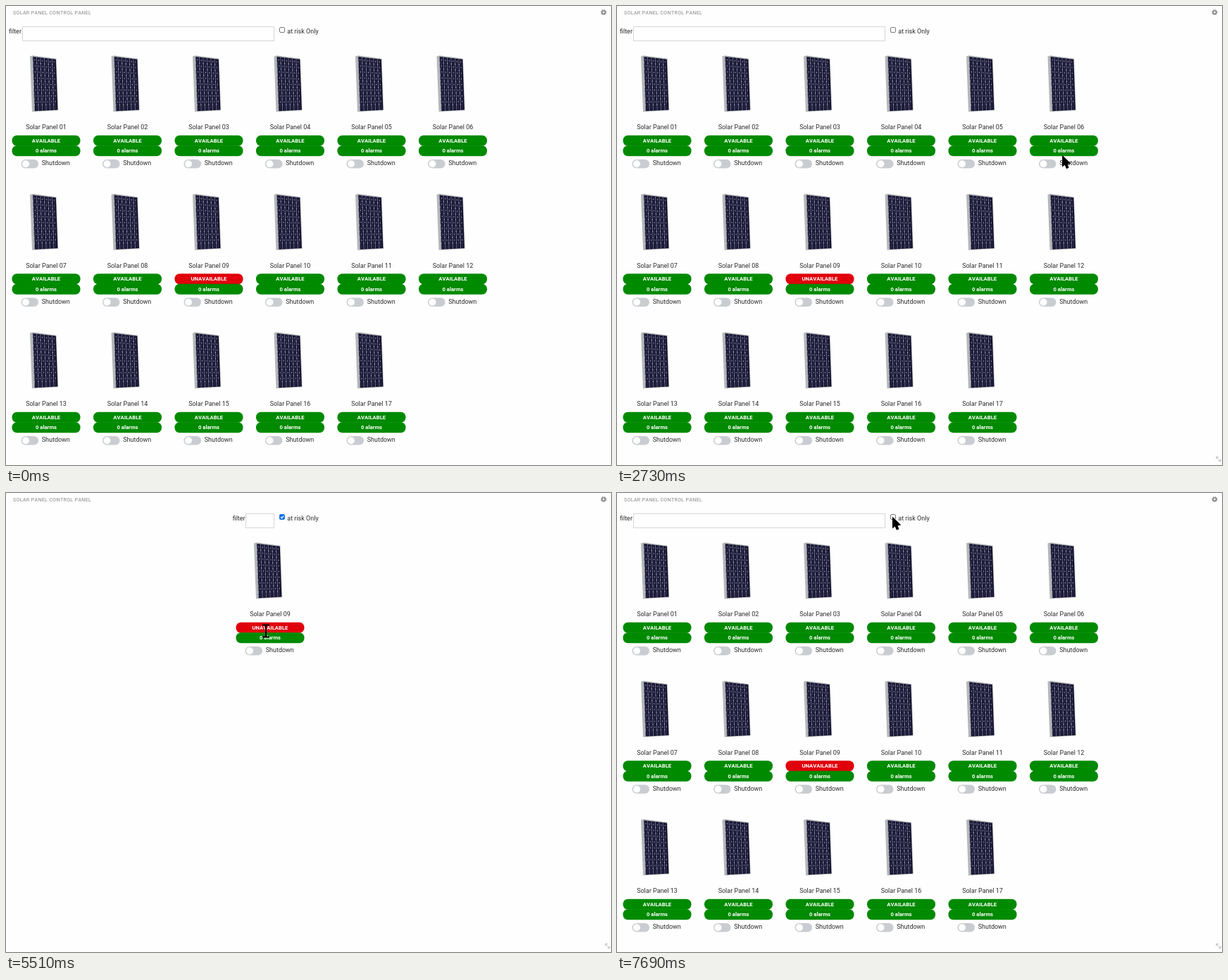
Animation, 859 px wide and 652 px high, one loop 8000 ms. Source, as an HTML page:

```html
<!DOCTYPE html>
<html lang="en">
<head>
<meta charset="utf-8">
<title>Solar panel control panel</title>
<style>
  html, body { margin: 0; width: 100%; height: 100%; overflow: hidden; background: #fefefe; }
  svg { display: block; font: 9px Roboto, sans-serif; font-kerning: none; fill: #2b2b2b; }
  .title { font-size: 7px; letter-spacing: .38px; fill: #858585; }
  .badge { font-size: 7.7px; font-weight: 700; fill: #fff; }
  .mid { text-anchor: middle; }
  .line { fill: none; stroke: #858585; }
  #halo { fill: #fbf55a; mix-blend-mode: multiply; }
</style>
</head>
<body>
<svg width="859" height="652">
  <defs><g id="panel"></g></defs>

  <text class="title" x="10" y="11.5">SOLAR PANEL CONTROL PANEL</text>
  <g class="line" transform="translate(848.5 9)">
    <circle r="2.2" stroke-width="1.6"/>
    <circle r="3.4" stroke-width="1.3" stroke-dasharray="1.5 1.17"/>
  </g>
  <path id="grip" class="line" d="M851.5 641l5 5M851 643.5v-3h3M857 643.5v3h-3" opacity=".55"/>

  <text id="filter" y="38.5">filter</text>
  <rect id="input" y="29.5" height="20" fill="#fff" stroke="#d6d6d6"/>
  <rect id="box" x="388.5" y="30.5" width="7" height="7" rx="1.5"/>
  <path id="tick" d="M390 34.2l1.5 1.7 2.8-3.5" fill="none" stroke="#fff" stroke-width="1.2"/>
  <text x="399.3" y="38.5">at risk Only</text>

  <g id="all"></g>
  <g id="risk"></g>

  <circle id="halo" cy="34.5" r="10.5"/>
  <g id="cursor">
    <path id="arrow" d="M0 0V17L3.6 14 6 19.3 9.5 17.8 7.5 13 12.3 12Z" fill="#000"/>
    <path id="beam" d="M-5-8H5M0-8V9M-5 9H5" stroke="#000" stroke-width="2"/>
  </g>
</svg>
<script>
const $ = id => document.getElementById(id);
const show = (id, on) => $(id).style.display = on ? '' : 'none';
const set = (id, attrs) => Object.entries(attrs).forEach(([k, v]) => $(id).setAttribute(k, v));
const mix = (a, b, k) => a + (b - a) * k;
const mixPoint = (p, q, k) => p.map((n, i) => mix(n, q[i], k));

// Point on the slanted glass face, u across and v down
const glass = (u, v) => mixPoint(
  mixPoint([38, 72], [70.8, 75.8], u),
  mixPoint([40.7, 149.3], [73.4, 147.6], u), v).map(n => n.toFixed(1)).join(' ');

function drawPanel() {
  const cols = 6, rows = 9;
  let gaps = '', seams = '', dots = '';
  for (let c = 0; c < cols; c++) {
    const edge = c / cols, middle = (c + .5) / cols;
    seams += `M${glass(middle, .02)}L${glass(middle, .98)}`;
    gaps += `M${glass(edge, 0)}L${glass(edge, 1)}`;
    for (let r = 1; r < rows; r++)
      dots += `M${glass(edge, r / rows)}h.01M${glass(middle, (r - .5) / rows)}h.01`;
  }
  $('panel').innerHTML = `
    <path d="M34 71.5L38 70.3 71.5 74.7 74.2 148.2 37 150.3Z" fill="#b4b8b8"/>
    <path d="M${glass(0, 0)}L${glass(1, 0)}L${glass(1, 1)}L${glass(0, 1)}Z" fill="#15132f"/>
    <path d="${seams}" stroke="#3b3b60" stroke-width=".7"/>
    <path d="${gaps}" stroke="#8585a0" stroke-width=".8"/>
    <path d="${dots}" stroke="#d4d4de" stroke-width="1.2" stroke-linecap="round"/>`;
}

function badge(top, color, label) {
  return `<rect x="8.5" y="${top}" width="97" height="15" rx="7" fill="${color}"/>
    <text class="badge mid" x="57" y="${top + 9.8}">${label}</text>`;
}

function unit(n, x, y) {
  const down = n === 9, green = '#008a00';
  return `<g transform="translate(${x} ${y})">
    <use href="#panel"/>
    <text class="mid" x="57" y="175.3">Solar Panel ${String(n).padStart(2, '0')}</text>
    ${badge(183.8, down ? '#e0000b' : green, down ? 'UNAVAILABLE' : 'AVAILABLE')}
    ${badge(198.3, green, '0 alarms')}
    <rect x="21.5" y="218" width="24.5" height="12.5" rx="6.25" fill="#c9ccd1"/>
    <circle cx="28" cy="224.2" r="5" fill="#fff"/>
    <text x="50.7" y="226.3">Shutdown</text>
  </g>`;
}

// Each glide starts where the last one ended; bend is the control point of its curve
const glides = [];
let last = [830, 662];
function glide(start, end, to, bend = mixPoint(last, to, .5)) {
  glides.push({ start, end, from: last, bend, to });
  last = to;
}
glide(590, 800, [723, 567]);
glide(1200, 1740, [762, 309], [770, 460]);
glide(2530, 3130, [393, 33]);
glide(4910, 5510, [369, 195.5], [400, 280]);
glide(5770, 6500, [396, 93], [430, 180]);
glide(6580, 6580, [396, 60]);
glide(6770, 6900, [396, 31]);
glide(7100, 7100, [391, 33.5]);

// The pointer advances in steps of a fifteenth of a second
function pointer(t) {
  const g = glides.findLast(g => t >= g.start);
  if (!g) return null;
  const step = 1000 / 15, steps = Math.round((g.end - g.start) / step) + 1;
  const k = t >= g.end ? 1 : (Math.floor((t - g.start) / step) + 1) / steps;
  const e = k * k * (3 - 2 * k);
  return mixPoint(mixPoint(g.from, g.bend, e), mixPoint(g.bend, g.to, e), e);
}

function render(t) {
  const risky = t >= 3660 && t < 7690;
  show('all', !risky);
  show('risk', risky);
  show('tick', risky);
  show('grip', t >= 940);
  set('filter', { x: risky ? 321.7 : 4 });
  set('input', { x: risky ? 340.5 : 23.5, width: risky ? 40 : 357 });
  set('box', { fill: risky ? '#1672e6' : '#fff', stroke: risky ? '#1672e6' : '#777' });

  const at = pointer(t);
  show('halo', [3530, 7560].some(click => t >= click && t < click + 130));
  show('cursor', at);
  if (!at) return;
  const [x, y] = at;
  const overText = x > 349 && x < 395 && y > 185 && y < 213;
  show('arrow', !overText);
  show('beam', overText);
  set('halo', { cx: x + 1 });
  set('cursor', { transform: `translate(${x} ${y})` });
}

drawPanel();
$('all').innerHTML = Array.from({ length: 17 }, (_, i) =>
  unit(i + 1, i % 6 * 115.5, Math.floor(i / 6) * 196.5)).join('');
$('risk').innerHTML = unit(9, 318, 0);

const begin = performance.now();
function frame() {
  render((performance.now() - begin) % 8000);
  requestAnimationFrame(frame);
}
frame();
</script>
</body>
</html>
```
